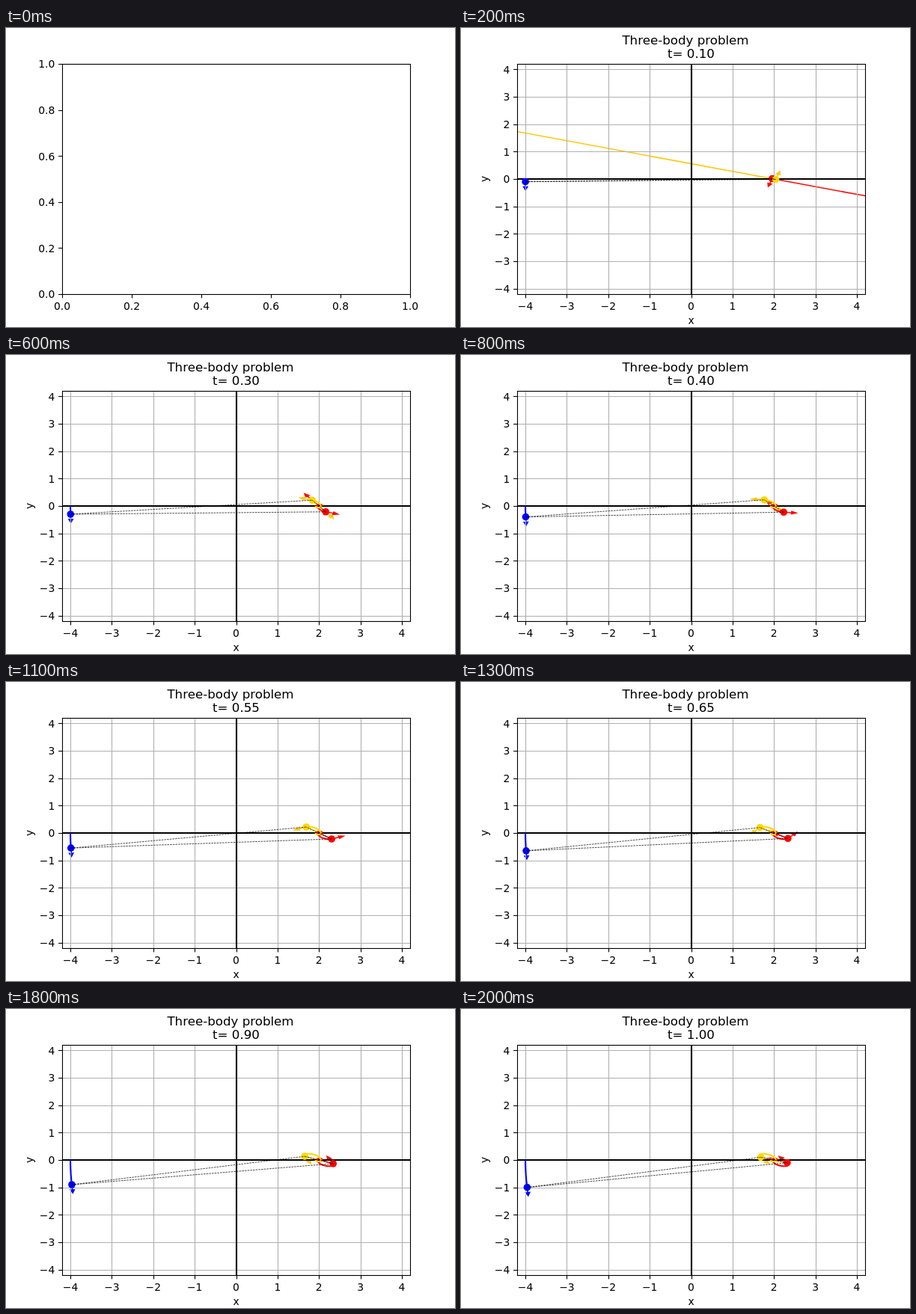
An HTML page for the animation above (2100 ms loop, 600 by 400 pixels).

```html
<!DOCTYPE html>
<html lang="en">
<head>
<meta charset="utf-8">
<title>Three-body problem</title>
<style>
html, body { margin: 0; width: 100%; height: 100%; overflow: hidden; background: #fff; }
svg { display: block; width: 600px; height: 400px; }
text { font: 13.89px "DejaVu Sans", sans-serif; }
.title { font-size: 16.67px; }
</style>
</head>
<body>
<svg id="stage" viewBox="0 0 600 400"></svg>
<script>
const STEP = 100, COUNT = 21, DT = 0.05;
const BOX = { left: 75, top: 48, right: 540, bottom: 356 };
const COLORS = { blue: '#0000ff', red: '#ff0000', gold: '#ffd700' };
const ARROWS = { blue: '#0000ff', red: '#ff0a00', gold: '#ffc80a' };

// Offset of the red body from the pair's centre: time, x, y, vx, vy
const KNOTS = [
  [0, 0.08, 0, 0.3, 1.6],
  [0.05, 0.035, 0.055, -1.6, 0.4],
  [0.1, -0.043, 0.012, -0.9, -2.7],
  [0.15, 0.015, -0.12, 1.2, -1.4],
  [0.2, 0.07, -0.17, 1.07, -0.64],
  [0.4, 0.235, -0.225, 0.6, -0.06],
  [0.55, 0.307, -0.218, 0.39, 0.14],
  [0.8, 0.352, -0.158, -0.02, 0.31],
  [1, 0.32, -0.1, -0.37, 0.43]
];

const px = x => 307.5 + x * 465 / 8.4;
const py = y => 202 - y * 308 / 8.4;
const snap = v => Math.floor(v + 0.5) + 0.5;
const point = ([x, y]) => px(x).toFixed(2) + ',' + py(y).toFixed(2);
const attrs = o => Object.entries(o).map(([k, v]) => ` ${k}="${v}"`).join('');
const tag = (name, o, body = '') => `<${name}${attrs(o)}>${body}</${name}>`;
const line = (x1, y1, x2, y2, stroke = '#000', width = 1.11) =>
  tag('line', { x1, y1, x2, y2, stroke, 'stroke-width': width });
const label = (x, y, body, extra = {}) =>
  tag('text', { x, y, 'text-anchor': 'middle', ...extra }, body);

// Cubic Hermite interpolation of the orbit
function orbit(t) {
  let i = 0;
  while (i < KNOTS.length - 2 && t > KNOTS[i + 1][0]) i++;
  const a = KNOTS[i], b = KNOTS[i + 1], h = b[0] - a[0], s = (t - a[0]) / h;
  const s2 = s * s, s3 = s2 * s;
  const value = k => (2 * s3 - 3 * s2 + 1) * a[k] + (s3 - 2 * s2 + s) * h * a[k + 2] +
    (3 * s2 - 2 * s3) * b[k] + (s3 - s2) * h * b[k + 2];
  const slope = k => (6 * s2 - 6 * s) * (a[k] - b[k]) / h +
    (3 * s2 - 4 * s + 1) * a[k + 2] + (3 * s2 - 2 * s) * b[k + 2];
  return { pos: [value(1), value(2)], vel: [slope(1), slope(2)] };
}

function bodies(t) {
  const { pos: [x, y], vel: [u, v] } = orbit(t);
  return {
    blue: { pos: [-4 + 0.042 * t * t, -t], vel: [0.084 * t, -1] },
    red: { pos: [2 + x, y], vel: [u, v] },
    gold: { pos: [2 - x, -y], vel: [-u, -v] }
  };
}

function arrow([x, y], [dx, dy], length, color) {
  const n = Math.hypot(dx, dy), ux = dx / n, uy = dy / n;
  const at = (along, side) => point([x + ux * along - uy * side, y + uy * along + ux * side]);
  const neck = Math.max(0, length - 0.11);
  return tag('path', {
    d: `M${at(0, 0)}L${at(neck, 0)}L${at(neck, 0.045)}L${at(length, 0)}L${at(neck, -0.045)}L${at(neck, 0)}`,
    fill: color, stroke: color, 'stroke-width': 1.6
  });
}

function trail(name, t) {
  const pts = [];
  for (let i = 0, n = Math.round(t / 0.01); i <= n; i++) pts.push(point(bodies(i * 0.01)[name].pos));
  return tag('polyline', {
    points: pts.join(' '), fill: 'none', stroke: COLORS[name],
    'stroke-width': 2.08, 'stroke-linejoin': 'round'
  });
}

function dashes(a, b) {
  return tag('path', {
    d: `M${point(a.pos)}L${point(b.pos)}`, stroke: '#000',
    'stroke-width': 0.7, 'stroke-dasharray': '2.57 1.11'
  });
}

const tickX = (x, text) => line(snap(x), 356.5, snap(x), 361.4) + label(x, 377, text);
const tickY = (y, text) => line(70.1, snap(y), 75.5, snap(y)) +
  label(65.3, y + 5.3, text, { 'text-anchor': 'end' });
const frame = tag('rect', {
  x: 75.5, y: 48.5, width: 465, height: 308, fill: 'none', stroke: '#000', 'stroke-width': 1.11
});

function emptyAxes() {
  let out = frame;
  for (let i = 0; i <= 5; i++) {
    const text = (i / 5).toFixed(1);
    out += tickX(BOX.left + 93 * i, text) + tickY(BOX.bottom - 61.6 * i, text);
  }
  return out;
}

let grid = '', ticks = '';
for (let i = -4; i <= 4; i++) {
  const text = String(i).replace('-', '\u2212');
  const gx = snap(px(i)), gy = snap(py(i));
  grid += line(gx, BOX.top, gx, BOX.bottom, '#b0b0b0') + line(BOX.left, gy, BOX.right, gy, '#b0b0b0');
  ticks += tickX(px(i), text) + tickY(py(i), text);
}
const axes = line(BOX.left, 202, BOX.right, 202, '#000', 2.08) +
  line(308, BOX.top, 308, BOX.bottom, '#000', 2.08);
const clip = '<clipPath id="plot"><rect x="75" y="48" width="465" height="308"/></clipPath>';

function plot(t) {
  const all = bodies(t), { blue, red, gold } = all, names = Object.keys(all);
  const gap = [gold.pos[0] - red.pos[0], gold.pos[1] - red.pos[1]];
  const pull = 0.24 / (gap[0] ** 2 + gap[1] ** 2);
  const arrows = arrow(red.pos, gap, pull, ARROWS.red) +
    arrow(gold.pos, gap.map(v => -v), pull, ARROWS.gold) +
    names.map(n => arrow(all[n].pos, all[n].vel, 0.3, ARROWS[n])).join('');
  const trails = names.map(n => trail(n, t)).join('');
  const dots = names.map(n => tag('circle', {
    cx: px(all[n].pos[0]), cy: py(all[n].pos[1]), r: 4.8, fill: COLORS[n]
  })).join('');
  const links = dashes(blue, red) + dashes(blue, gold) + dashes(red, gold);
  return clip +
    tag('g', { 'clip-path': 'url(#plot)' }, arrows + grid + axes + trails + dots + links) +
    ticks + frame +
    label(300, 22, 'Three-body problem', { class: 'title' }) +
    label(307.5, 40, 't= ' + t.toFixed(2), { class: 'title' }) +
    label(307.5, 396, 'x') +
    label(0, 0, 'y', { transform: 'translate(36 202) rotate(-90)' });
}

const stage = document.getElementById('stage');
const start = performance.now();
let shown = -1;

function draw() {
  const step = Math.floor((performance.now() - start) / STEP) % COUNT;
  if (step !== shown) {
    shown = step;
    stage.innerHTML = step ? plot(step * DT) : emptyAxes();
  }
  requestAnimationFrame(draw);
}
draw();
</script>
</body>
</html>
```
